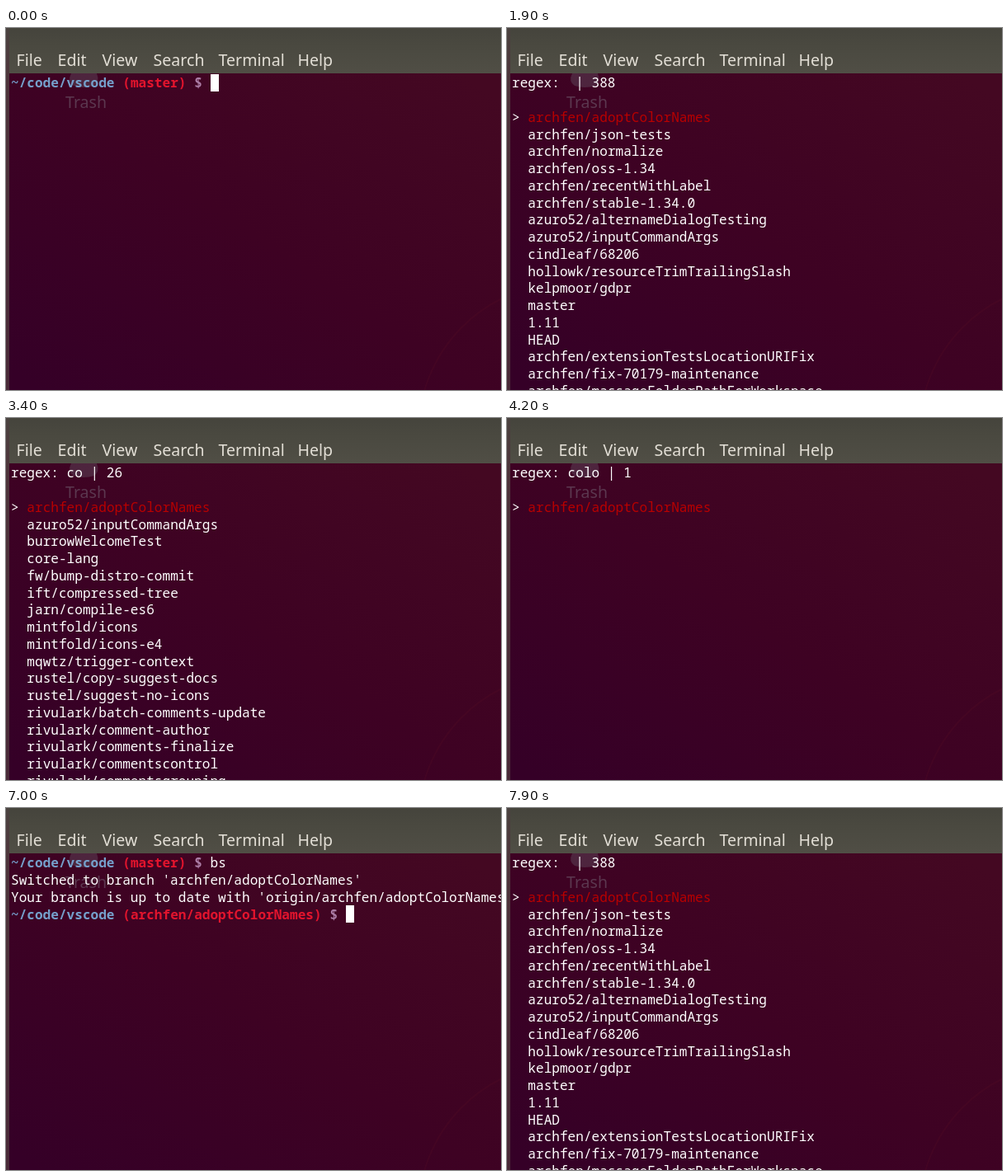
Animation of 600x439 px, one loop 8 s. Source, as an HTML page with a canvas:

```html
<!DOCTYPE html>
<html lang="en">
<head>
<meta charset="utf-8">
<title>Branch switcher</title>
<style>
  html, body { margin: 0; width: 600px; height: 439px; overflow: hidden; background: #3c0024; }
  canvas { display: block; }
</style>
</head>
<body>
<canvas id="stage" width="600" height="439"></canvas>
<script>
const ctx = document.getElementById('stage').getContext('2d');
const W = 600, H = 439, TOP = 55, LOOP = 8000;
const CELL = 9.66, LINE = 20.74, LEFT = 6, BASE = 72.4;
const MONO = '16.1px "Noto Sans Mono", monospace';
const SANS = '19.6px "Noto Sans", sans-serif';
const WHITE = '#ffffff', BLUE = '#759fcb', RED = '#e2142d', PURPLE = '#ad7fa8', PICK = '#b80000';

const PICKED = 'archfen/adoptColorNames';
const branches = [
  PICKED, 'archfen/json-tests', 'archfen/normalize', 'archfen/oss-1.34',
  'archfen/recentWithLabel', 'archfen/stable-1.34.0',
  'azuro52/alternameDialogTesting', 'azuro52/inputCommandArgs',
  'cindleaf/68206', 'hollowk/resourceTrimTrailingSlash', 'kelpmoor/gdpr',
  'master', '1.11', 'HEAD',
  'archfen/extensionTestsLocationURIFix', 'archfen/fix-70179-maintenance',
  'archfen/massageFolderPathForWorkspace',
  'burrowWelcomeTest', 'core-lang', 'fw/bump-distro-commit',
  'ift/compressed-tree', 'jarn/compile-es6', 'mintfold/icons', 'mintfold/icons-e4',
  'mqwtz/trigger-context', 'rustel/copy-suggest-docs', 'rustel/suggest-no-icons',
  'rivulark/batch-comments-update', 'rivulark/comment-author',
  'rivulark/comments-finalize', 'rivulark/commentscontrol', 'rivulark/commentsgrouping'
];
const counts = { '': 388, c: 251, co: 26, col: 1, colo: 1 };

function write(text, col, row, color = WHITE, weight = 500) {
  ctx.font = `${weight} ${MONO}`;
  ctx.fillStyle = color;
  ctx.fillText(text, LEFT + col * CELL, BASE + row * LINE);
}

function cursor(col, row) {
  ctx.fillStyle = WHITE;
  ctx.fillRect(Math.round(LEFT + col * CELL), Math.round(56 + row * LINE), 10, 21);
}

// Returns the column right after the prompt.
function prompt(branch, row) {
  const path = '~/code/vscode', tag = `(${branch})`;
  const tagCol = path.length + 1, endCol = tagCol + tag.length + 1;
  write(path, 0, row, BLUE, 700);
  write(tag, tagCol, row, RED, 700);
  write('$', endCol, row, PURPLE, 700);
  return endCol + 2;
}

function promptLine(branch, row, typed, showCursor) {
  const col = prompt(branch, row);
  write(typed, col, row);
  if (showCursor) cursor(col + typed.length, row);
}

function picker(query) {
  write(`regex: ${query} | ${counts[query]}`, 0, 0);
  write('>', 0, 2);
  branches
    .filter(name => name.toLowerCase().includes(query))
    .slice(0, 17)
    .forEach((name, i) => write(name, 2, i + 2, i ? WHITE : PICK));
}

function switched(t) {
  promptLine('master', 0, 'bs', false);
  if (t < 5300) return cursor(0, 1);
  write(`Switched to branch '${PICKED}'`, 0, 1);
  write(`Your branch is up to date with 'origin/${PICKED}'.`, 0, 2);
  const typed = t < 7200 ? '' : t < 7400 ? 'b' : 'bs';
  const hidden = (t >= 5900 && t < 6500) || (t >= 7100 && t < 7200);
  promptLine(PICKED, 3, typed, !hidden);
}

function gradient(x0, y0, x1, y1, stops) {
  const g = ctx.createLinearGradient(x0, y0, x1, y1);
  stops.forEach(([at, color]) => g.addColorStop(at, color));
  return g;
}

function drawWindow() {
  ctx.fillStyle = gradient(130, 500, 470, 0, [[0, '#350027'], [0.5, '#3e0223'], [1, '#440822']]);
  ctx.fillRect(0, TOP, W, H - TOP);

  // Desktop showing faintly through the terminal
  ctx.strokeStyle = 'rgba(110, 30, 40, 0.13)';
  ctx.lineWidth = 2;
  ctx.beginPath();
  ctx.arc(680, 490, 180, Math.PI, Math.PI * 1.5);
  ctx.stroke();
  ctx.fillStyle = 'rgba(115, 125, 135, 0.28)';
  ctx.beginPath();
  ctx.moveTo(79, TOP);
  ctx.lineTo(110, TOP);
  ctx.quadraticCurveTo(114, 65, 107, 70);
  ctx.quadraticCurveTo(94, 74, 82, 70);
  ctx.quadraticCurveTo(74, 65, 79, TOP);
  ctx.fill();
  ctx.font = SANS;
  ctx.fillStyle = '#5b374f';
  ctx.fillText('Trash', 72, 97);

  ctx.fillStyle = gradient(0, 0, 0, TOP,
    [[0, '#45443c'], [0.4, '#4a4940'], [1, '#504e45']]);
  ctx.fillRect(0, 0, W, TOP);
  ctx.fillStyle = gradient(0, 0, 0, H, [[0, '#4b4340'], [0.15, '#4e343b'], [1, '#4a2a38']]);
  ctx.fillRect(0, 0, 4, H);

  ctx.fillStyle = '#e2ded5';
  const menu = { File: 12, Edit: 62, View: 116, Search: 178, Terminal: 257, Help: 353 };
  for (const [label, x] of Object.entries(menu)) ctx.fillText(label, x + 0.5, 46);
}

function draw(t) {
  drawWindow();
  if (t < 1900) {
    const typed = t < 1100 ? '' : t < 1300 ? 'b' : 'bs';
    promptLine('master', 0, typed, t < 100 || t >= 800);
  } else if (t < 5100) {
    const typed = [3300, 3400, 3600, 3700].filter(at => t >= at).length;
    picker('colo'.slice(0, typed));
  } else if (t < 7700) {
    switched(t);
  } else {
    picker('');
  }
}

const start = performance.now();
function tick() {
  draw((performance.now() - start) % LOOP);
  requestAnimationFrame(tick);
}
tick();
</script>
</body>
</html>
```
